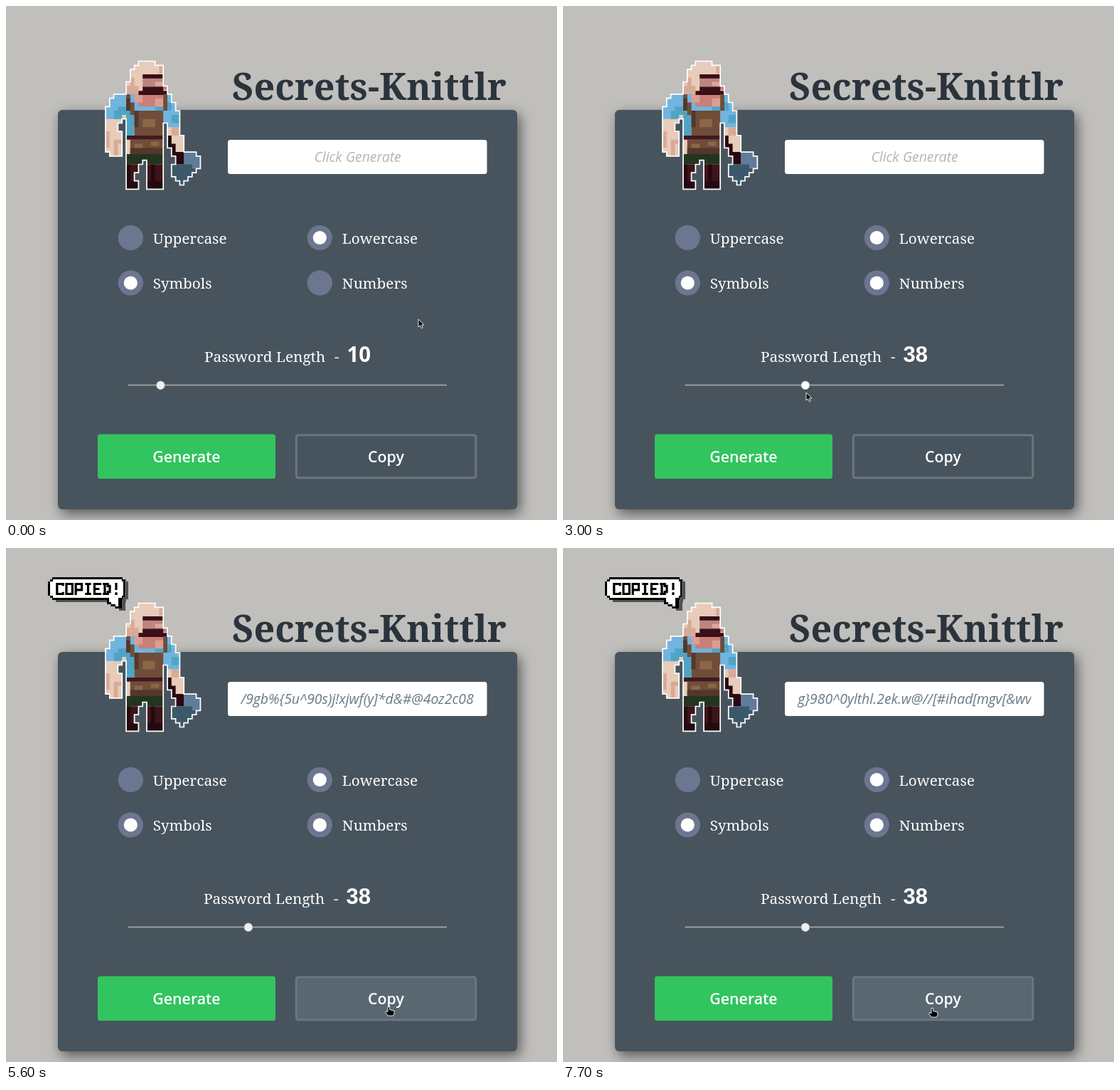
Write an HTML page that moves like this. It is 775 px wide and 722 px high and loops after 8000 ms.

```html
<!DOCTYPE html>
<html lang="en">
<head>
<meta charset="utf-8">
<title>Password generator</title>
<style>
  html, body { margin: 0; width: 100%; height: 100%; overflow: hidden; background: #c0bfbc; }
  svg { display: block; }
  text { font: 20.8px "Noto Serif", serif; fill: #fff; }
  .panel { fill: #48545d; filter: drop-shadow(4px 6px 9px rgba(0, 0, 0, .55)); }
  .title { font-size: 52px; font-weight: 700; fill: #2b343d; }
  .button { font: 600 21.3px "Open Sans", sans-serif; }
  .field { font: italic 19.45px "Open Sans", sans-serif; fill: #6c7a83; }
  .field.empty { fill: #b2b6b6; }
  .middle { text-anchor: middle; }
  #length { font: 700 29.5px "Open Sans", sans-serif; }
  #length.wide { font: 700 31px "Liberation Sans", sans-serif; }
</style>
</head>
<body>
<svg width="775" height="722" viewBox="0 0 775 722">
  <clipPath id="fieldClip"><rect x="330" y="190" width="328.5" height="44"/></clipPath>
  <rect class="panel" x="73" y="146" width="646" height="561" rx="6"/>
  <text class="title middle" x="511" y="132">Secrets-Knittlr</text>

  <g id="smith" transform="translate(140 77.5) scale(5.8)"></g>

  <g id="bubble">
    <path id="bubbleShape" fill="#55514f" transform="translate(5 3)" d="M65 41H164V44H167V69H164V73H163V85H154V82H148V79H142V73H65V70H62V67H59V47H62V44H65Z"/>
    <use href="#bubbleShape" transform="translate(-5 -3)" style="filter:brightness(0)"/>
    <path fill="#fff" d="M66 44H163V47H165V67H163V70H158V82H154V79H148V76H145V70H66V67H62V47H66Z"/>
    <g id="copied" transform="translate(71.8 50.5) scale(2.8)" fill="none" stroke="#000" stroke-width="1.15"></g>
  </g>

  <rect x="312" y="188" width="364.5" height="48" rx="3.5" fill="#fff"/>
  <g clip-path="url(#fieldClip)"><text id="field" y="219"></text></g>

  <g id="options"></g>

  <g id="lengthRow">
    <text y="500">Password Length</text>
    <text x="183" y="500">-</text>
    <text id="length" x="200.5" y="500"></text>
  </g>
  <path d="M171.5 532.5H620" stroke="#abb1ae" stroke-width="1.6"/>
  <circle id="thumb" cy="532.8" r="6.1" stroke="#858a8b" stroke-width=".7"/>

  <rect id="generate" x="129" y="601.5" width="250" height="62.5" rx="3.5"/>
  <text class="button middle" x="254" y="640.5">Generate</text>
  <rect id="copy" x="408.3" y="602.8" width="252.5" height="60" rx="3" stroke="#6a7781" stroke-width="3"/>
  <text class="button middle" x="534.5" y="640.5">Copy</text>

  <g id="cursor" stroke="#fff" stroke-width=".9">
    <path id="arrow" d="M0 0V11L2.6 8.7 4.3 12.6 6.2 11.8 4.5 8H8Z"/>
    <path id="hand" d="M-2 .5H.7V4.5L7 6V10L5.5 13H-2L-5 8.5-4.5 6.5-2 7.5Z"/>
  </g>
</svg>
<script>
const $ = id => document.getElementById(id);
const add = (id, markup) => $(id).insertAdjacentHTML('beforeend', markup);

// The blacksmith, on a grid of 23 by 31 cells
const body = 'M8 0H12V1H14V6H15V8H16V10H17V12H18V18H19V22H22V23H23V26H22V27H21V28H20V29H19V30H18V29H17V28H16V25H17V23H16V21H15V15H14V31H10V24H9V25H8V27H7V29H8V31H5V14H4V15H3V17H4V23H1V22H0V11H1V9H2V8H5V5H6V2H7V1H8Z';
const paint = (color, d) => add('smith', `<path fill="${color}" d="${d}"/>`);
paint('#e8cbb9', body);
paint('#d9aa98', 'M6 4h1v2h1v2h-3v-2h1zM13 1h1v2h-1zM0 17h1v4h-1zM2 19h2v1h-1v3h-1zM16 16h2v2h-2z');
paint('#70b4df', 'M2 8h14v2h1v2h1v4h-3v-1h-1v-3h-9v1h-1v1h-4v-3h1v-2h1z');
paint('#4fa4c5', 'M3 11h2v2h-1v1h-2v-2h1zM5 12h2v6h-2zM12 10h4v2h-4zM16 13h2v2h-2z');
paint('#bb8580', 'M9 4h5v2h1v1h-6z');
paint('#dba79b', 'M12 5h2v1h-2z');
paint('#c87f79', 'M8 8h6v2h-1v1h-5z');
paint('#dc9d92', 'M7 8h2v2h-2zM12 9h2v2h-2z');
paint('#3a0f17', 'M9 3.2h5v1h-5zM9 6.2h5v1h1v1h-7v-1h1z');
paint('#6f4d39', 'M5 8h1v2h1v2h7v6h-7v-5h-1v-1h-1zM14 8h1v4h-1zM6 19h8v3.5h-8z');
paint('#54372c', 'M5 9h1v3h-1zM7 12h1v4h-1zM6 21h8v1.5h-8z');
paint('#8b6747', 'M9 14h3v2h-3zM7 20h2v1h-2zM11 19.5h2v1h-2z');
paint('#41181f', 'M5 18h9v1h-9z');
paint('#23351f', 'M5 22.5h9v2.5h-4v-1h-1v1h-4z');
paint('#3d1419', 'M5 25h3v2h-1v2h1v2h-3zM10 25h4v6h-4z');
paint('#240a10', 'M5 25h1v4h2v2h-3zM11 25h1v4h2v2h-4v-2h1z');
paint('#280910', 'M15 18h1v2h1v2h2v3h-2v-2h-1v-2h-1z');
paint('#3b596b', 'M17 25h2v-3h3v1h1v3h-1v1h-1v1h-1v1h-1v1h-1v-1h-1v-1h-1v-3z');
paint('#617b9a', 'M19 22h3v1h1v3h-2v-1h-2z');
add('smith', `<path d="${body}" fill="none" stroke="#fff" stroke-width=".3"/>`);

// Pixel lettering in the speech bubble
['M3 1V0H0V5H3V4', 'M0 0H3V5H0Z', 'M0 5.5V0H3V3H0', 'M0 0H3M1.5 0V5M0 5H3', 'M3.5 0H0V5H3.5M0 2.5H2.5',
 'M.5 0V5M-.5 0H2V1H3V4H2V5H-.5', 'M1.5-.5V3M1.5 4.2V5.5']
  .forEach((d, i) => add('copied', `<path d="${d}" transform="translate(${i * 4.7})"/>`));

['Uppercase', 'Lowercase', 'Symbols', 'Numbers'].forEach((name, i) => {
  const x = 175.3 + i % 2 * 266, y = i < 2 ? 325.5 : 389;
  add('options', `<circle cx="${x}" cy="${y}" r="17.6" fill="#6d7690"/>
    <circle id="${name}" cx="${x}" cy="${y}" r="9.6" fill="#fff"/>
    <text x="${x + 31.5}" y="${y + 8}">${name}</text>`);
});
$('Uppercase').style.display = 'none';

const path = [[500, 580, 440], [1000, 459, 404], [1200, 459, 404], [1600, 323, 513], [1800, 323, 513],
  [2100, 214, 536], [2300, 214, 536], [2800, 342, 536], [3000, 342, 543], [3200, 334, 609], [3300, 334, 609],
  [3400, 325, 635], [3800, 325, 635], [4000, 425, 637], [4500, 546, 645], [4800, 546, 645], [5100, 539, 644],
  [5600, 539, 644], [6000, 344, 645], [6700, 344, 645], [7100, 509, 646], [7200, 509, 646], [7400, 520, 646]];

function cursorAt(t) {
  const next = path.findIndex(key => key[0] > t);
  if (next <= 0) return path.at(next).slice(1);
  const [t0, x0, y0] = path[next - 1], [t1, x1, y1] = path[next];
  const k = (t - t0) / (t1 - t0);
  return [x0 + (x1 - x0) * k, y0 + (y1 - y0) * k];
}

const show = (id, visible) => $(id).style.display = visible ? '' : 'none';
const ramp = (t, from, span) => Math.min(1, Math.max(0, (t - from) / span));

function draw(t) {
  const within = (from, to) => t >= from && t < to;

  const [x, y] = cursorAt(t);
  const onGenerate = within(3200, 3900) || within(6000, 6700);
  const onCopy = within(4000, 5900) || t >= 6900;
  $('cursor').setAttribute('transform', `translate(${x} ${y})`);
  show('hand', onGenerate || onCopy);
  show('arrow', !onGenerate && !onCopy);
  $('generate').setAttribute('fill', onGenerate ? '#40ca6b' : '#32c45f');
  $('copy').setAttribute('fill', onCopy ? '#596771' : '#48545d');

  show('Numbers', t >= 1200);

  const value = t < 2300 ? 10 : Math.round(9 + 29 * ramp(t, 2300, 500));
  $('thumb').setAttribute('cx', 213 + (value - 9) * 4.41);
  $('thumb').setAttribute('fill', within(2100, 3100) ? '#fff' : '#eeeeec');
  $('length').textContent = value;
  $('length').setAttribute('class', value > 10 ? 'wide' : '');
  $('lengthRow').setAttribute('transform', `translate(${value < 10 ? 286.5 : value > 10 ? 278 : 279})`);

  const empty = t < 3600;
  $('field').textContent = empty ? 'Click Generate'
    : t < 6300 ? '/9gb%{5u^90s)j!xjwf(y]*d&#@4oz2c08' : 'g}980^0ylthl.2ek.w@//[#ihad[mgv[&wv';
  $('field').setAttribute('class', empty ? 'field empty middle' : 'field');
  $('field').setAttribute('x', empty ? 494.5 : 330.5);

  $('bubble').style.opacity = t < 5700 ? ramp(t, 4800, 300) : ramp(t, 7500, 200);
}

// The interface advances in steps of 100 ms
function tick(now) {
  draw(Math.floor(now % 8000 / 100) * 100);
  requestAnimationFrame(tick);
}
draw(0);
requestAnimationFrame(tick);
</script>
</body>
</html>
```
